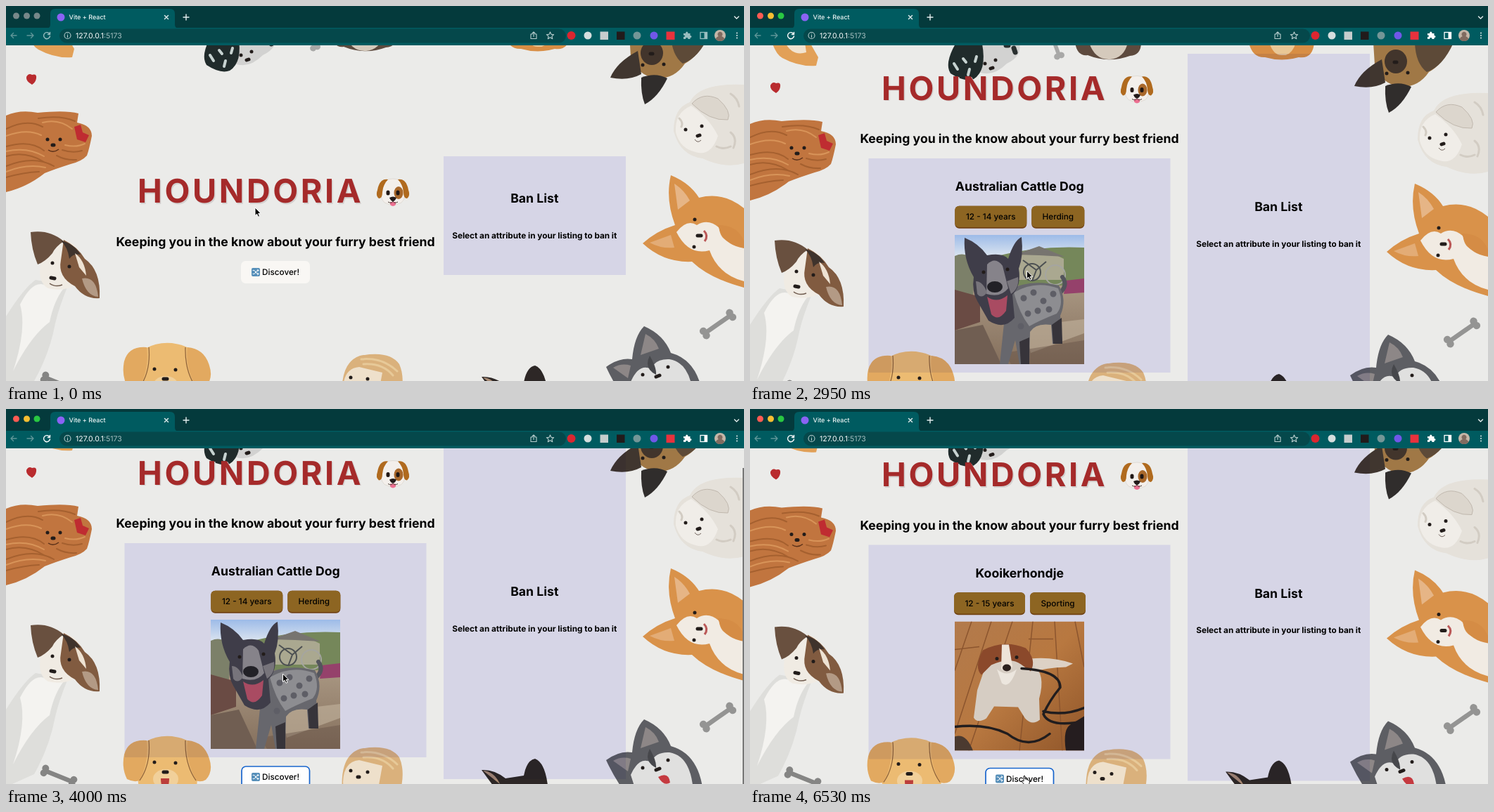
Write an HTML page that moves like this. It is 1049 by 534 pixels and loops after 8 s.

```html
<!DOCTYPE html>
<html lang="en">
<head>
<meta charset="utf-8">
<title>Dog finder</title>
<style>
html, body { margin: 0; width: 100%; height: 100%; overflow: hidden; background: #ebebe9; }
svg { display: block; width: 100vw; height: 100vh; }
text { font-family: Inter, "Liberation Sans", sans-serif; font-optical-sizing: none; text-rendering: geometricPrecision; }
.h2 { font-size: 17.65px; font-weight: 700; }
.mid { text-anchor: middle; }
.btn { font-size: 11.75px; font-weight: 500; }
.panel { fill: #e9e8fc; mix-blend-mode: multiply; }
.eye { stroke: #221c1a; stroke-width: 5; stroke-linecap: round; }
.line { fill: none; stroke-linecap: round; stroke-linejoin: round; }
</style>
</head>
<body>
<svg viewBox="0 0 1049 534" preserveAspectRatio="none">
<defs>
  <clipPath id="square"><rect width="184" height="184"/></clipPath>
  <linearGradient id="sky" x2="0" y2="1"><stop stop-color="#9dbbe8"/><stop offset="1" stop-color="#eef1f2"/></linearGradient>
  <linearGradient id="ground" x2="0" y2="1"><stop stop-color="#c0b09a"/><stop offset="1" stop-color="#85705d"/></linearGradient>
  <linearGradient id="floor" x2="1" y2="1"><stop stop-color="#b27a4c"/><stop offset=".5" stop-color="#b87840"/><stop offset="1" stop-color="#8f5529"/></linearGradient>
  <g id="bone"><path class="line" d="M-20 0H20" stroke-width="7" stroke="currentColor"/><path d="M-24-4h0M-24 4h0M24-4h0M24 4h0" class="line" stroke-width="11" stroke="currentColor"/></g>
</defs>
<rect width="1049" height="534" fill="#ebebe9"/>

<g id="dogs">
  <!-- top edge -->
  <path d="M32 42Q38 58 46 62Q70 75 94 73L97 61 85 40Z" fill="#e2a057"/>
  <path d="M50 40Q60 60 80 54L78 40Z" fill="#f1e3d0"/>
  <path d="M37 112Q28 107 29 101Q32 95 37 98Q44 96 43 103Q42 109 37 112Z" fill="#b92b2e"/>
  <path d="M322 40H383Q387 60 365 70Q345 90 325 82Z" fill="#d2d2d1"/>
  <path d="M292 42Q276 70 285 84Q305 97 318 92Q337 80 330 42Z" fill="#202b2b"/>
  <path class="line" d="M290 70l5 8M303 63l4 5M312 78l-2 8M322 60l-2 7" stroke="#c6d2d0" stroke-width="4"/>
  <path class="line" d="M375 48l2 6M364 44h3" stroke="#2a3030" stroke-width="7"/>
  <path class="eye" d="M349 65h0M334 70h0M345 76l-3 1"/>
  <use href="#bone" color="#a8a8a7" transform="translate(433 41) rotate(70) scale(.8)"/>
  <path d="M462 40Q465 60 480 58Q510 70 540 59Q556 58 556 40Z" fill="#5d4a3e"/>
  <path d="M482 40Q490 65 512 64Q532 62 537 40Z" fill="#d5cabc"/>
  <path d="M709 40Q714 62 732 61Q756 68 780 61Q800 64 802 40Z" fill="#d88e45"/>
  <path d="M738 40Q744 59 757 58Q770 59 776 40Z" fill="#e9c796"/>

  <!-- shepherd -->
  <path d="M886 40H1000Q984 72 965 82Q950 104 925 103Q898 100 888 72Z" fill="#a07846"/>
  <path d="M945 40H1000Q985 74 962 82Q946 70 945 40Z" fill="#5d4a38"/>
  <path d="M898 64Q868 80 859 102Q885 107 903 97Z" fill="#40362f"/>
  <path d="M903 102Q902 125 908 140Q927 130 940 103Q923 94 903 102Z" fill="#302d2c"/>
  <ellipse cx="918" cy="67" rx="16" ry="17" fill="#42352c"/>
  <path class="eye" d="M905 84h0M935 83h0M916 68h3"/>

  <!-- white curly -->
  <path d="M949 178Q949 145 972 137Q985 109 1049 112V224Q1022 232 990 217Q958 213 949 178Z" fill="#e5e1da"/>
  <path d="M952 180Q950 152 974 142Q1000 160 1012 185Q1002 215 980 208Q958 203 952 180Z" fill="#f0ede8"/>
  <path d="M975 139Q990 122 1012 132Q1032 150 1026 162Q1000 164 975 139Z" fill="#dcd6cd" stroke="#c0b8ae"/>
  <path class="line" d="M957 160q6 6 3 12M1030 180q10 8 4 22M1010 200q10 5 20 0M1030 125q10 6 12 18" stroke="#d2ccc3" stroke-width="3"/>
  <path class="eye" d="M966 176h0M989 171h0M983 185l3-1" stroke-width="4"/>
  <path d="M979 190q4 6 9 1" fill="none" stroke="#6d5f58"/>

  <!-- corgi -->
  <path d="M945 241Q972 252 985 273Q1020 264 1049 288V401Q1000 388 975 364Q935 366 905 338Q925 320 951 312Q937 275 945 241Z" fill="#d9924a"/>
  <path d="M950 253Q964 262 972 277L955 290Z" fill="#e6b586"/>
  <path d="M915 337L945 326 950 344Q932 346 915 337Z" fill="#e3ac76"/>
  <path d="M953 322Q968 303 982 312Q998 302 1014 316Q1014 338 1049 341V392Q1012 382 1000 348Q970 356 953 322Z" fill="#f1ebe3"/>
  <path d="M1012 312Q1040 312 1049 335V345Q1018 340 1012 312Z" fill="#d58c45"/>
  <path class="eye" d="M979 304h0M978 343h0M983 327h5"/>
  <path d="M992 320Q999 327 993 335" fill="none" stroke="#bb5958" stroke-width="3"/>
  <use href="#bone" color="#949493" transform="translate(1012 453) rotate(-35) scale(.95)"/>

  <!-- yorkie -->
  <path d="M0 156Q20 147 45 152Q85 148 103 153L101 166Q122 170 122 185Q118 205 115 213Q108 221 92 225Q70 232 55 238Q30 258 0 265Z" fill="#c1753f"/>
  <path class="line" d="M0 175Q30 160 52 172M0 200Q35 190 54 206M0 214Q28 206 54 222M0 228Q40 212 68 228M0 244Q25 237 47 236M46 160Q78 155 98 164M80 205Q95 210 108 206M72 213Q85 220 100 219" stroke="#a5602f" stroke-width="2"/>
  <path class="line" d="M0 185Q30 174 50 184M0 207Q30 200 54 214M0 236Q30 224 56 230M52 166Q75 160 94 175M84 198Q100 202 112 196" stroke="#d89459" stroke-width="2"/>
  <path d="M97 172L106 169 109 180 118 184 113 194 101 190Z" fill="#bf2c31"/>
  <path class="eye" d="M59 190h0M77 190h0M66 198h2" stroke-width="4"/>
  <path d="M60 205q7 5 15-1" fill="none" stroke="#5a3019" stroke-width="1.5"/>

  <!-- terrier -->
  <path d="M0 442Q25 402 42 390L88 398Q75 430 70 452Q62 495 40 534L0 552Z" fill="#dededb"/>
  <path d="M20 425Q35 395 50 396L82 402Q68 420 62 450Q35 470 10 520Q30 460 20 425Z" fill="#f4f3f0"/>
  <path d="M50 336Q95 323 106 355Q118 385 98 398Q80 407 60 402Q45 394 49 368Z" fill="#f0ebe3"/>
  <path d="M35 322Q62 318 82 335Q70 343 66 352Q56 364 45 368Q36 347 35 322Z" fill="#69503f"/>
  <path d="M82 333Q102 343 112 360Q135 376 133 416Q112 418 98 399Q73 386 78 362Z" fill="#815b40"/>
  <path d="M78 334Q96 338 106 354Q96 352 90 360Q88 344 78 334Z" fill="#3f332c"/>
  <path d="M98 352Q112 362 114 384L104 372Z" fill="#eee2d2"/>
  <path d="M108 388Q128 384 131 414Q114 413 108 388Z" fill="#b39a85"/>
  <path class="eye" d="M66 366h0M90 371h0M64 387l5 1"/>
  <path d="M62 395q8 6 18 2" fill="none" stroke="#6e5a4d" stroke-width="1.5"/>

  <!-- bottom edge -->
  <use href="#bone" color="#858584" transform="translate(75 537) rotate(22) scale(.9)"/>
  <path d="M190 560Q180 500 197 488Q228 472 260 487Q278 502 270 560Z" fill="#ecbb72"/>
  <path d="M200 486Q174 484 168 506Q164 525 172 541Q182 546 190 543Q204 515 200 486ZM258 486Q282 488 289 512Q295 530 284 542Q277 546 270 543Q254 512 258 486Z" fill="#e2a960"/>
  <path d="M203 486Q206 520 190 543M255 486Q254 520 270 543" fill="none" stroke="#8c6038" stroke-width="1.2"/>
  <ellipse cx="227" cy="541" rx="18" ry="14" fill="#f1d09a"/>
  <path d="M220 540h12q0 14-6 14t-6-14Z" fill="#bb3d3a"/>
  <path class="eye" d="M211 517h0M241 518h0M224 531h5"/>
  <path d="M478 560Q474 508 503 498Q545 490 559 510Q568 530 560 560Z" fill="#dab17c"/>
  <path d="M479 545Q480 516 502 514L535 522 528 560H480Z" fill="#eee0cb"/>
  <path class="line" d="M505 503Q535 500 556 520M508 510Q535 508 550 526" stroke="#e7c998" stroke-width="3"/>
  <path class="eye" d="M490 529h0M514 531h0M500 538h2" stroke-width="3.500"/>
  <path d="M736 536Q740 514 752 512Q768 518 771 560H700Q688 545 676 528Q694 527 710 540Z" fill="#2d2726"/>
  <path d="M678 529Q694 530 702 548Z" fill="#a88a73"/>
  <path d="M907 456Q935 468 945 494Q985 505 991 560H880Q865 540 853 514Q872 500 890 503Q893 470 907 456Z" fill="#5d5e63"/>
  <path d="M909 467Q923 474 928 488L902 497ZM863 515Q875 508 888 512L884 530Z" fill="#8d8787"/>
  <path d="M888 535Q900 508 917 517Q923 502 943 503Q974 508 977 560H896Z" fill="#e0e0df"/>
  <path d="M915 498Q925 515 924 525Q906 516 915 498Z" fill="#46474b"/>
  <path d="M927 538Q942 530 944 546Q935 552 927 538Z" fill="#c53a40"/>
  <path class="eye" d="M905 525h0M941 514h0M924 528l5-2"/>
</g>

<rect id="side" class="panel" x="622" width="259"/>
<g id="ban" class="mid">
  <text class="h2" x="751.3" y="280">Ban List</text>
  <text x="751.3" y="330.5" font-size="11.75" font-weight="700">Select an attribute in your listing to ban it</text>
</g>

<g id="head">
  <g font-size="46.6" font-weight="700" letter-spacing="3.64">
    <text x="188.5" y="281.5" fill="#d3d0cf">HOUNDORIA</text>
    <text x="187" y="280" fill="#a52a2a">HOUNDORIA</text>
  </g>
  <g transform="translate(550 265)">
    <path d="M-16-10Q-12-19 0-19T16-10Q20 8 12 15Q0 21-12 15Q-20 8-16-10Z" fill="#f3efeb" stroke="#d6cec6" stroke-width=".6"/>
    <path d="M-7-18Q-19-20-22-3Q-25 5-20 9Q-15 9-15 0Q-14-11-7-18ZM7-18Q19-20 22-3Q25 5 20 9Q15 9 15 0Q14-11 7-18Z" fill="#b06a1e"/>
    <ellipse cx="8" cy="1" rx="6.500" ry="9" fill="#a9682b"/>
    <path class="line" d="M-7 0v2M7 0v2" stroke="#211714" stroke-width="5"/>
    <path d="M-4 14h8v4q-4 4-8 0Z" fill="#ec6f91"/>
    <path d="M-5 8Q0 5 5 8Q3 13 0 13T-5 8Z" fill="#221a19"/>
    <path d="M-7 14Q-2 17 0 13Q2 17 7 14" fill="none" stroke="#4b3a34"/>
  </g>
  <text class="h2 mid" x="383" y="341.5">Keeping you in the know about your furry best friend</text>
</g>

<g id="card">
  <rect class="panel" x="168.500" y="217" width="429" height="305"/>
  <g id="first"></g>
  <g id="second"></g>
  <g transform="translate(291 326)" clip-path="url(#square)">
    <g id="photo1">
      <rect width="184" height="184" fill="url(#ground)"/>
      <rect width="184" height="40" fill="url(#sky)"/>
      <path d="M60 30Q120 15 184 18V72H60Z" fill="#75875a"/>
      <path d="M88 27L120 17 155 34V64H88Z" fill="#aaa890"/>
      <path d="M86 28L120 16 156 31 120 29Z" fill="#77746f"/>
      <path d="M0 30Q18 22 28 40L26 85H0Z" fill="#7c8069"/>
      <path d="M0 78L36 88V124L0 136Z" fill="#6a4b44"/>
      <path d="M0 136L40 128 66 184H0Z" fill="#705e52"/>
      <path d="M100 130L184 120V140L108 168Z" fill="#c4b59e" opacity=".6"/>
      <path d="M70 168L184 150V184H80Z" fill="#5f4c42" opacity=".4"/>
      <g fill="none" stroke="#4c5052" stroke-width="2"><circle cx="110" cy="53" r="12"/><path d="M97 36L116 50 130 38M116 50L110 66"/><circle cx="143" cy="57" r="14" stroke="#a5a5a0"/></g>
      <path d="M158 65L184 62V82L155 84Z" fill="#95416b"/>
      <path class="line" d="M148 84Q162 72 153 60" stroke="#53545c" stroke-width="6"/>
      <path d="M75 78Q110 62 148 72Q160 92 150 115L153 155H139L137 128Q115 125 107 138L106 184H92L86 150 76 184H64Z" fill="#67676d"/>
      <path d="M84 82Q115 64 147 76Q156 98 145 112Q120 122 106 130Q92 112 84 82Z" fill="#8d8d91"/>
      <path class="line" d="M98 90h0M112 82h0M126 94h0M140 84h0M118 108h0M134 106h0M104 112h0M94 130h0" stroke="#5e5e66" stroke-width="9"/>
      <path d="M138 128L152 118 153 155H140ZM92 152L106 146V184H94Z" fill="#37343a"/>
      <path d="M14 4Q34 12 46 29Q68 25 76 34Q84 8 95 3Q98 30 91 48Q95 72 82 85L85 118Q70 136 48 122L32 94Q24 80 27 60Q12 35 14 4Z" fill="#3f3d49"/>
      <path d="M46 42Q58 30 68 44L76 76Q65 90 45 84Z" fill="#86838a"/>
      <path d="M30 66Q40 66 46 82Q38 92 32 84ZM74 66L90 60Q92 76 80 84Z" fill="#77747b"/>
      <path d="M46 88Q60 98 75 86L73 108Q62 124 52 113Z" fill="#a94b62"/>
      <ellipse cx="57" cy="74" rx="11" ry="8" fill="#222127"/>
      <path class="eye" d="M41 53h0M75 49h0"/>
    </g>
    <g id="photo2">
      <rect width="184" height="184" fill="url(#floor)"/>
      <path d="M24 0L0 70M52 0L0 160M82 0L20 184M111 0L92 184M142 0L153 184M171 0L184 65M0 40L35 36M50 88L78 84M105 25H140" stroke="#8c552e" stroke-width="1.5" fill="none"/>
      <path d="M108 53Q140 50 168 60L158 65Q130 66 110 72Z" fill="#ddd1c5"/>
      <path d="M45 60Q75 38 111 61Q130 75 120 110L121 140Q110 149 100 138L90 122 56 121 45 138Q32 146 27 137L32 98Z" fill="#d6cdc3"/>
      <path d="M40 41Q70 25 101 38Q117 55 108 71L94 61Q79 50 52 62L38 76Q27 66 40 41Z" fill="#8b492b"/>
      <path d="M67 33H77L82 64Q77 76 66 68Z" fill="#eee4d9"/>
      <path d="M60 68Q74 80 88 68Q78 97 67 88Z" fill="#ece6de"/>
      <ellipse cx="74" cy="66" rx="6" ry="5" fill="#2c211e"/>
      <path class="eye" d="M60 53h0M88 51h0"/>
      <path class="line" d="M95 67Q150 70 150 94Q135 112 126 132Q135 152 184 142M126 128Q155 135 184 123M0 150Q45 145 75 160Q105 184 135 160" stroke="#211d1e" stroke-width="3.500"/>
      <path d="M158 184Q153 152 166 146L184 135V184Z" fill="#251d1f"/>
      <path d="M0 164Q16 158 26 184H0Z" fill="#4b3a30"/>
    </g>
  </g>
</g>

<g id="discover">
  <rect x="334" y="363" width="98" height="32" rx="6.500" fill="#f9f7f4"/>
  <rect id="ring" x="335" y="364" width="96.500" height="30" rx="6" fill="#fefefe" stroke="#1764cc" stroke-width="1.700"/>
  <rect x="349" y="373" width="12" height="12" rx="2" fill="#568fb9"/>
  <path class="line" d="M351 376.500h2l4 5h2M351 381.500h2l4-5h2M357.500 375l1.500 1.500-1.500 1.500M357.500 380l1.500 1.500-1.500 1.500" stroke="#fff"/>
  <text class="btn" x="364" y="383">Discover!</text>
</g>
<rect id="thumb" x="1047" width="2" height="452" fill="#777"/>

<!-- browser -->
<rect width="1049" height="33" fill="#043a3c"/>
<rect y="31" width="1049" height="25" fill="#005b60"/>
<path d="M57 32Q63 32 63 26V11Q63 4 70 4H233Q240 4 240 11V26Q240 32 246 32Z" fill="#005b60"/>
<rect x="76" y="32.500" width="720" height="20" rx="10" fill="#05484b"/>
<g id="lights"><circle cx="14.500" cy="14" r="4.500"/><circle cx="29.500" cy="14" r="4.500"/><circle cx="44" cy="14" r="4.500"/></g>
<circle cx="78" cy="16" r="5.500" fill="#8a63f4"/>
<text x="89.500" y="19.300" font-size="9" font-weight="500" fill="#eef6f6">Vite + React</text>
<text x="99" y="45.800" font-size="10.500" fill="#fff">127.0.0.1<tspan fill="#a5bfc0">:5173</tspan></text>
<g class="line" stroke="#e4eeee" stroke-width="1.400">
  <path d="M225.500 13.500l5 5m0-5l-5 5M252 16h8M256 12v8M1035.500 15l3 3 3-3"/>
  <path d="M15 42H7l3.500-3.500M7 42l3.500 3.500M30 42h9l-3.500-3.500M39 42l-3.500 3.500" stroke="#5f9698"/>
  <g stroke="#b9cece" stroke-width="1.100"><circle cx="87.500" cy="42" r="4.500"/><path d="M87.500 41.500v3M87.500 39.700v.1M748 40h-2v6.500h8V40h-2M750 43.500V37l-2 2m2-2l2 2"/><path d="M773.500 37l1.500 3.400 3.700.3-2.800 2.500.9 3.600-3.300-2-3.200 2 .8-3.600-2.800-2.500 3.700-.3Z"/></g>
</g>
<g id="active">
  <path class="line" d="M61.700 39.500A4.500 4.500 0 1 0 62.500 43M62.500 37.500v3h-3" stroke="#fff" stroke-width="1.400"/>
  <path d="M963 39h3q0-2.500 1.800-2.500t1.700 2.500h3v3q2 0 2 1.600t-2 1.600V47h-3q0-2-1.700-2t-1.800 2h-3v-3q2 0 2-1.300t-2-1.300Z" fill="#fff"/>
  <rect x="987" y="37.500" width="9.500" height="9" fill="none" stroke="#fff" stroke-width="1.300"/><path d="M992.500 37.500h4v9h-4Z" fill="#fff"/>
</g>
<circle cx="803.500" cy="42" r="6" fill="#dc2630"/>
<circle cx="827" cy="42" r="5.500" fill="#d5dede"/>
<rect x="844.500" y="36.500" width="11.500" height="11.500" fill="#c5cdcd"/>
<rect x="868" y="36.500" width="11.500" height="11.500" fill="#211b1b"/>
<circle cx="897" cy="42" r="5.500" fill="#739697"/>
<circle cx="921" cy="42" r="5.500" fill="#7057e8"/>
<rect x="938.500" y="36.500" width="12" height="11.500" fill="#e8323d"/>
<circle cx="1015" cy="42" r="8" fill="#c5b6a8"/><path d="M1008.500 46.700a8 8 0 0 0 13 0q-2-3-4.300-3.700a3.500 3.500 0 1 0-4.400 0q-2.300.7-4.300 3.700Z" fill="#806b60"/>
<path class="line" d="M1039 38.500h0M1039 42h0M1039 45.500h0" stroke="#dce8e8" stroke-width="2"/>

<g id="cursor" stroke="#fff" stroke-linejoin="round">
  <path id="arrow" d="M0 0V11.500L2.600 9.200 4.500 13.300 6.500 12.400 4.700 8.400H8.200Z" fill="#000"/>
  <path id="hand" d="M-1 1Q0-1 1 1V5Q3 4 3.500 6Q5.500 5 6 7Q8 7 7.500 9L6.500 13H0L-4 8Q-4 6-1 8Z" fill="#fff" stroke="#111"/>
</g>
</svg>

<script>
const $ = id => document.getElementById(id);
const show = (id, on) => $(id).setAttribute("visibility", on ? "visible" : "hidden");
const move = (id, x, y) => $(id).setAttribute("transform", `translate(${x} ${y})`);

// Linear track through [time, value] points
function track(t, points) {
  const i = points.findIndex(p => p[0] > t);
  if (i === 0) return points[0][1];
  if (i < 0) return points[points.length - 1][1];
  const [t0, a] = points[i - 1], [t1, b] = points[i];
  return a + (b - a) * (t - t0) / (t1 - t0);
}

function tag(x, w, label) {
  return `<rect x="${x}" y="284.700" width="${w}" height="32" rx="6" fill="#704213"/>
    <rect x="${x}" y="284.700" width="${w}" height="30.300" rx="6" fill="#8d6522"/>
    <text class="btn mid" x="${x + w / 2}" y="304">${label}</text>`;
}

function fill(id, name, ...tags) {
  $(id).innerHTML = `<text class="h2 mid" x="383.3" y="263">${name}</text>` +
    tags.map(a => tag(...a)).join("");
}
fill("first", "Australian Cattle Dog", [291.3, 102, "12 - 14 years"], [400.3, 75, "Herding"]);
fill("second", "Kooikerhondje", [290, 101, "12 - 15 years"], [398, 79, "Sporting"]);

const scrollPath = [[3699, 0], [3700, 14], [3850, 25], [4000, 26], [4290, 24.5], [4730, 23.5]];
const cursorX = [[150, 354], [870, 374.5], [1470, 374.5], [1760, 393.5], [4440, 393.5], [4730, 394], [5330, 390]];
const cursorY = [[150, 287], [870, 377], [4300, 377], [4730, 498], [5330, 522]];
const lights = ["#ff5b53", "#f7be32", "#29c842"];

function draw(now) {
  const t = now % 8000;
  const open = t >= 2500, focused = t >= 1020, next = t >= 6230;
  const scroll = track(t, scrollPath);
  const shift = (open ? 12 : 0) - scroll;

  move("dogs", 0, shift);
  move("ban", 0, shift);
  move("head", 0, open ? -146.5 - scroll : 0);
  move("card", 0, -scroll);
  move("discover", 0, open ? 171 - scroll : 0);
  $("side").setAttribute("y", open ? 68 - scroll : 214);
  $("side").setAttribute("height", open ? 485 : 169);

  $("card").style.display = open ? "" : "none";
  show("first", !next);
  show("second", next);
  show("photo1", t >= 2800 && t < 6530);
  show("photo2", t >= 6530);
  show("ring", t >= 1760);
  show("thumb", t >= 3700 && t < 4730);
  $("thumb").setAttribute("y", 58 + scroll);

  [...$("lights").children].forEach((c, i) => c.setAttribute("fill", focused ? lights[i] : "#778889"));
  $("active").setAttribute("opacity", focused ? 1 : .6);

  const y = track(t, cursorY);
  move("cursor", track(t, cursorX), y);
  show("arrow", y < 511);
  show("hand", y >= 511);
}

function loop() {
  draw(performance.now());
  requestAnimationFrame(loop);
}
loop();
</script>
</body>
</html>
```
